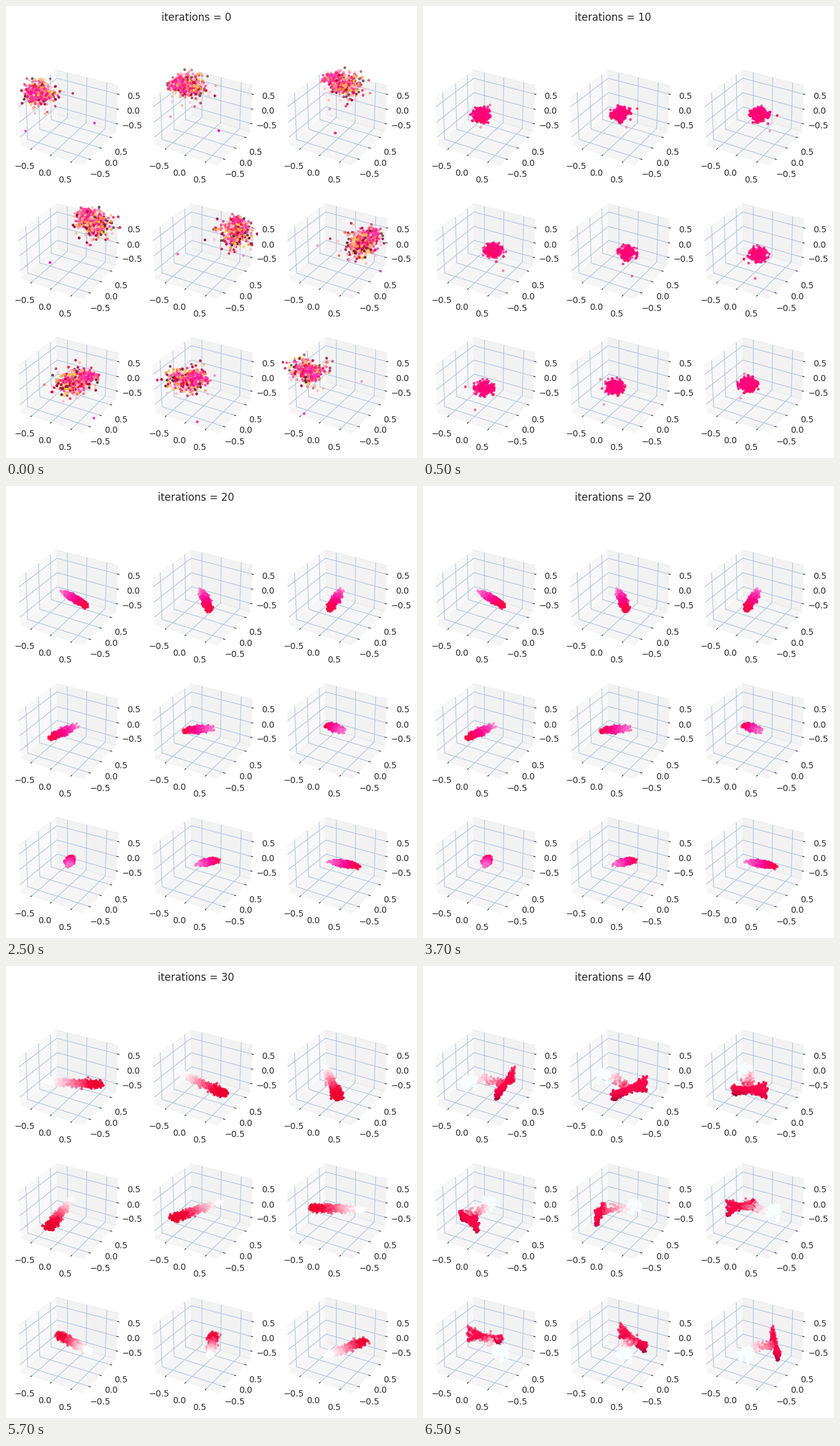
A matplotlib script that plays this animation: 669 by 735 pixels, repeating every 8000 ms.

```python
import numpy as np
import matplotlib.pyplot as plt
from matplotlib.animation import FuncAnimation
from matplotlib.colors import to_rgb

W, H, DPI = 669, 735, 100
LEFT = 9.44
LIMIT = 0.75 * 25 / 24
COUNT = 700
INTERVAL = 500
STAGE_STARTS = [0, 500, 2500, 4500, 6500]

plt.rcParams.update({
    "font.family": "DejaVu Sans",
    "grid.color": "#b0c4de",
    "axes.edgecolor": "white",
    "text.color": "0.15",
    "xtick.color": "0.15",
    "ytick.color": "0.15",
})


def polar(angle, radius, z):
    """Cylindrical coordinates to points; the angle is in degrees, clockwise."""
    a = np.radians(np.asarray(angle) - 30)
    return np.stack(np.broadcast_arrays(
        -radius * np.cos(a), radius * np.sin(a), z), axis=-1)


def between(a, b, t):
    return a + np.asarray(t)[:, None] * (b - a)


def ramp(t, stops):
    """Colours interpolated along (position, colour) stops."""
    at = [s[0] for s in stops]
    rgb = np.array([to_rgb(s[1]) for s in stops])
    return np.stack([np.interp(t, at, rgb[:, c]) for c in range(3)], axis=-1)


def pick(rng, colors, n):
    return np.array([to_rgb(c) for c in colors])[rng.integers(0, len(colors), n)]


def scattered(rng):
    t = 0.04 + 0.86 * rng.beta(1.2, 1.5, COUNT)
    pts = between(polar(-7, 0.79, 0.72), polar(46, 0.73, 0.44), t)
    noise = np.clip(rng.standard_t(3, (COUNT, 3)), -4.5, 4.5)
    pts += noise * (0.03 + 0.13 * t)[:, None]

    # Pink near the tip, mixed reds further out, warm and dark at the fringe.
    pinks = pick(rng, ["#ff1493", "#ff2fa5", "#ff45b0", "#ff50b4"], COUNT)
    reds = pick(rng, ["#ff1493", "#ff3ca8", "#f00038", "#ff2450", "#fa8072",
                      "#ff8c78", "#ff0a78", "#ffb0a0"], COUNT)
    warm = pick(rng, ["#ffa030", "#ffd23c", "#ffb080", "#fa7060", "#f00038",
                      "#ff40b0", "#ffb8d0", "#a80038", "#5a2c30"], COUNT)
    reach = 0.9 * t + 0.22 * np.linalg.norm(noise, axis=1) * (0.2 + t)
    reach = (reach + rng.normal(0, 0.12, COUNT))[:, None]
    colors = np.where(reach < 0.42, pinks, np.where(reach < 0.88, reds, warm))
    pts[:2] = polar(196, 0.57, -0.13), polar(-2, 0.97, -0.5)
    colors[:2] = to_rgb("#ff10b0")
    return pts, colors


def ball(rng):
    noise = np.clip(rng.standard_t(2.6, (COUNT, 3)), -5, 5)
    pts = polar(48, 0.16, -0.06) + 0.043 * noise
    pts[:2] = polar(70, 0.38, -0.68), polar(100, 0.48, 0)
    colors = ramp(rng.normal(0.5, 0.25, COUNT),
                  [(0, "#ff1048"), (0.5, "#ff0078"), (1, "#ff0c98")])
    colors[:2] = to_rgb("#ff1a50")
    return pts, colors


def spindle(rng):
    t = np.clip(rng.normal(0.56, 0.21, COUNT), -0.05, 1.08)
    pts = between(polar(36, 0.17, 0.07), polar(216, 0.42, -0.13), t)
    pts += rng.normal(0, 0.034, pts.shape)
    colors = ramp(t, [(0, "#ff70cc"), (0.25, "#ff3cb4"),
                      (0.55, "#ff0090"), (0.95, "#ff0045")])
    return pts, colors


def rod(rng):
    t = rng.uniform(0, 1, COUNT) ** 0.8
    pts = between(polar(-22, 0.57, -0.03), polar(190, 0.67, -0.2), t)
    pts += rng.normal(0, 1, pts.shape) * (0.028 + 0.022 * t)[:, None]
    colors = ramp(t, [(0.14, "#ffffff"), (0.35, "#ffb8cc"), (0.55, "#ff6a90"),
                      (0.78, "#f50038"), (1, "#e8002c")])
    return pts, colors


def creature(rng):
    # Wing: two tall ends joined by a lower band.
    n = 340
    s = rng.beta(0.75, 0.75, n)
    flare = 0.32 + 0.68 * (2 * s - 1) ** 2
    wing = between(polar(248, 0.56, -0.27), polar(169, 0.61, -0.02), s)
    wing[:, 2] += rng.uniform(-1, 1, n) * flare * (0.18 + 0.14 * s)
    wing += rng.normal(0, 0.02, wing.shape)
    wing_colors = ramp(wing[:, 2], [(-0.45, "#8c0030"), (-0.28, "#d80040"),
                                    (-0.1, "#ff0048"), (0.3, "#f8104c")])

    t = rng.uniform(0, 1, 85)
    neck = between(polar(-22, 0.22, -0.03), polar(208, 0.44, -0.1), t)
    neck += rng.normal(0, 0.055, neck.shape)
    neck_colors = ramp(t, [(0, "#fff0f4"), (0.35, "#ffb4c8"),
                           (0.7, "#ff5c84"), (1, "#f81450")])

    body = polar(-22 + rng.normal(0, 8, 200), 0.37 + rng.normal(0, 0.075, 200),
                 -0.03 + rng.normal(0, 0.045, 200))
    side, end = rng.choice([-1, 1], (2, 90))
    legs = polar(-22 + 10 * side + rng.normal(0, 2, 90),
                 0.4 + 0.1 * end + rng.normal(0, 0.015, 90),
                 rng.uniform(-0.31, -0.03, 90))
    white = np.tile(to_rgb("#f8ffff"), (290, 1))
    return (np.vstack([wing, neck, body, legs]),
            np.vstack([wing_colors, neck_colors, white]))


STAGES = [make(np.random.default_rng(7 + i)) for i, make in
          enumerate((scattered, ball, spindle, rod, creature))]

fig, grid = plt.subplots(3, 3, figsize=(W / DPI, H / DPI), dpi=DPI,
                         subplot_kw={"projection": "3d"})
fig.subplots_adjust(left=LEFT / W, right=(LEFT + 620) / W, top=1 - 90 / H,
                    bottom=29 / H, wspace=0.2, hspace=0.2)
title = fig.suptitle("", x=(LEFT + 300) / W, y=1 - 10 / H)
for ax in grid.flat:
    ax.set(xlim=(-LIMIT, LIMIT), ylim=(-LIMIT, LIMIT), zlim=(-LIMIT, LIMIT))
    for axis in (ax.xaxis, ax.yaxis, ax.zaxis):
        axis.set_ticks([-0.5, 0, 0.5])


def turned(pts, degrees):
    a = np.radians(degrees)
    x, y, z = pts.T
    return x * np.cos(a) - y * np.sin(a), x * np.sin(a) + y * np.cos(a), z


def update(frame):
    stage = np.searchsorted(STAGE_STARTS, frame * INTERVAL, side="right") - 1
    title.set_text(f"iterations = {10 * stage}")
    pts, colors = STAGES[stage]
    for k, ax in enumerate(grid.flat):
        for old in list(ax.collections):
            old.remove()
        ax.scatter(*turned(pts, -40 * k), c=colors, s=5)


anim = FuncAnimation(fig, update, frames=16, interval=INTERVAL,
                     init_func=lambda: update(0), repeat=True, repeat_delay=0)
plt.show()
```
